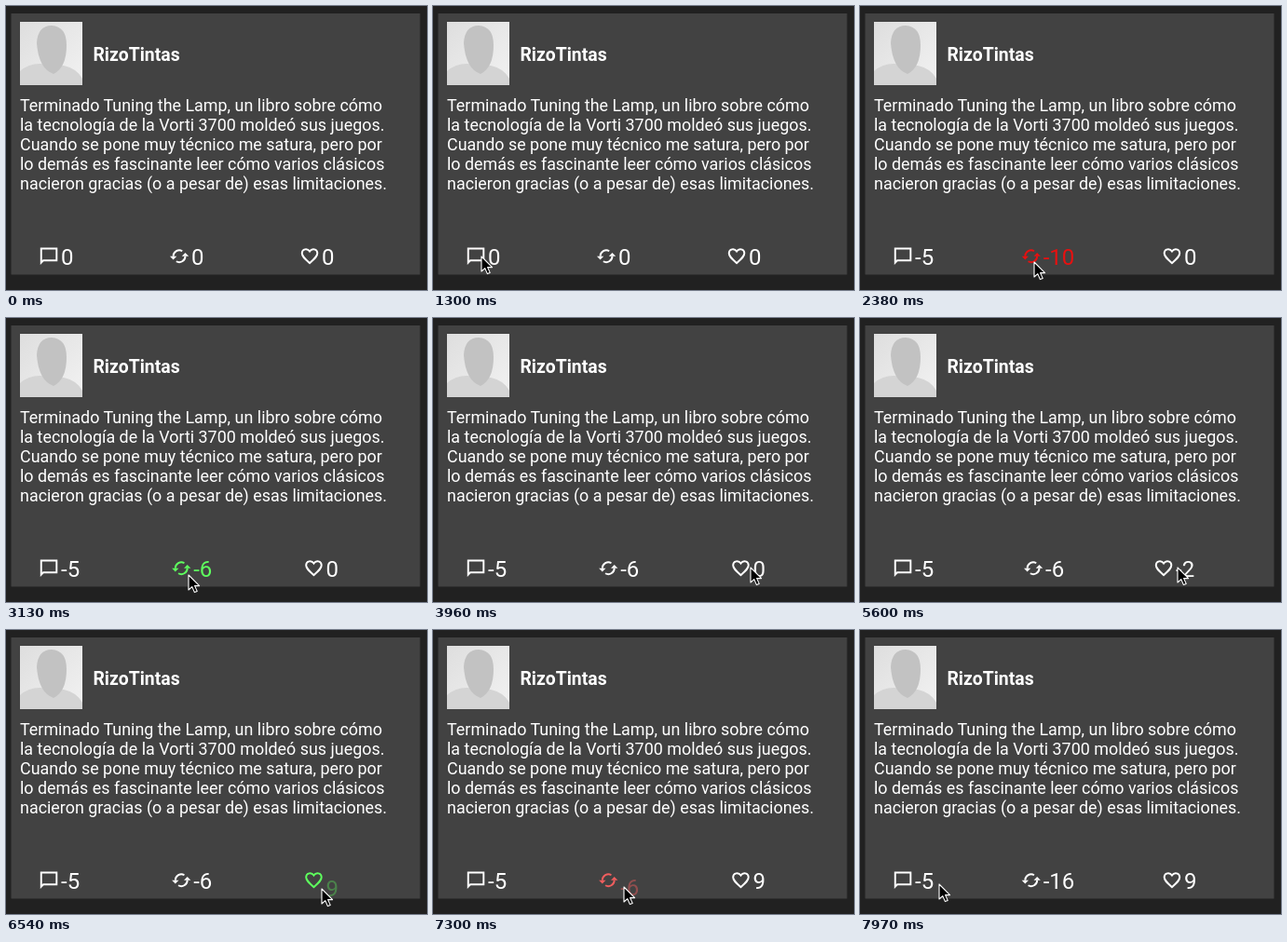
Recreate the animation shown at these times as an HTML page. Size 452 px wide and 305 px high, loop 8 s.

```html
<!DOCTYPE html>
<html lang="es">
<head>
<meta charset="utf-8">
<title>Tarjeta con contadores</title>
<style>
  html, body { margin: 0; width: 100%; height: 100%; overflow: hidden; background: #212121; }
  svg { display: block; font-family: Roboto, sans-serif; fill: #fff; }
  .name { font-size: 19.4px; font-weight: 700; }
  .body { font-size: 17.91px; }
  .stat { font-size: 24px; fill: currentColor; }
  .line { fill: none; stroke: currentColor; stroke-width: 2.1; }
</style>
</head>
<body>
<svg width="452" height="305" viewBox="0 0 452 305">
  <defs>
    <linearGradient id="paper" x1="0" y1="0" x2="1" y2="1">
      <stop offset="0" stop-color="#dedede"/>
      <stop offset="1" stop-color="#f2f2f2"/>
    </linearGradient>
    <clipPath id="frame"><rect x="15" y="17" width="67" height="68"/></clipPath>
    <g id="arrow">
      <path class="line" d="M5 12A7 7 0 0 1 15.5 6"/>
      <path d="M1 12H9L5 16Z"/>
    </g>
  </defs>
  <rect width="452" height="305" fill="#212121"/>
  <rect x="5.5" y="8" width="439" height="280.5" fill="#424242"/>

  <g clip-path="url(#frame)">
    <rect x="15" y="17" width="67" height="68" fill="url(#paper)"/>
    <path d="M15 85V70Q24 62 36 62L62 64Q76 67 82 78V85Z" fill="#d4d4d4"/>
    <path d="M33 40Q34 21 49 21Q65 22 65 42Q65 66 51 73Q35 67 33 40Z" fill="#c2c2c2"/>
  </g>

  <text class="name" x="93.5" y="59">RizoTintas</text>
  <g class="body">
    <text x="15" y="113">Terminado Tuning the Lamp, un libro sobre cómo</text>
    <text x="15" y="134">la tecnología de la Vorti 3700 moldeó sus juegos.</text>
    <text x="15" y="155">Cuando se pone muy técnico me satura, pero por</text>
    <text x="15" y="176">lo demás es fascinante leer cómo varios clásicos</text>
    <text x="15" y="197">nacieron gracias (o a pesar de) esas limitaciones.</text>
  </g>

  <g class="stat">
    <g><path class="line" d="M3 3H21V17H5.5L3 19.5Z"/></g>
    <text>0</text>
  </g>
  <g class="stat">
    <g><use href="#arrow"/><use href="#arrow" transform="rotate(180 12 12)"/></g>
    <text>0</text>
  </g>
  <g class="stat">
    <g><path class="line" d="M12 20C6 14.6 3 12 3 8.5C3 3.2 9.5 2.4 12 6.3C14.5 2.4 21 3.2 21 8.5C21 12 18 14.6 12 20Z"/></g>
    <text>0</text>
  </g>

  <path id="cursor" d="M0 0V16L3.8 12.6L6.4 18.6L9.2 17.4L6.6 11.6H11.6Z" fill="#000" stroke="#fff" stroke-width="1.1" stroke-linejoin="round"/>
</svg>
<script>
const LOOP = 8000;
const WHITE = [255, 255, 255], RED = [232, 16, 16], GREEN = [94, 255, 94];
const LEFT = 35, ROW_WIDTH = 420, ICON_WIDTH = 24, BASELINE = 278.4, SLIDE = 12;

// Clicks per counter: [time, new value]
const clicks = [
  [[1300, -5]],
  [[2090, -10], [2720, -6], [7220, -16]],
  [[3960, -4], [4760, -2], [5600, 4], [6330, 9]]
];

// Pointer stops: [arrival time, x, y]; it enters from below the stage
const stops = [
  [0, 150, 310], [580, 34, 271], [1160, 52, 269], [1930, 187, 275], [2700, 196, 276],
  [3730, 341, 268], [6500, 339, 278], [7030, 205, 276], [7970, 85, 273]
];

const stats = [...document.querySelectorAll('.stat')].map(el => ({
  el, icon: el.children[0], label: el.children[1]
}));
const cursor = document.getElementById('cursor');

const clamp = v => Math.max(0, Math.min(1, v));
const ramp = (t, a, b) => clamp((t - a) / (b - a));
const mix = (a, b, p) => a + (b - a) * p;

function counter(list, t) {
  let from = 0, value = 0, start = -LOOP;
  for (const [time, next] of list) {
    if (t < time) break;
    from = value; value = next; start = time;
  }
  const age = t - start, up = value > from;
  const leaving = age < 160;
  const shown = leaving ? 1 - ramp(age, 0, 150) : ramp(age, 170, 290);
  const side = up === leaving ? -1 : 1;
  const tint = ramp(age, 0, 120) * (1 - ramp(age, 430, 600));
  const target = up ? GREEN : RED;
  return {
    text: leaving ? from : value,
    shown,
    dy: side * SLIDE * (1 - shown),
    color: `rgb(${WHITE.map((c, i) => Math.round(mix(c, target[i], tint)))})`
  };
}

function drawStats(t) {
  const widths = stats.map(({ el, label }, i) => {
    const s = counter(clicks[i], t);
    label.textContent = s.text;
    label.setAttribute('opacity', s.shown);
    label.setAttribute('y', BASELINE + s.dy);
    el.setAttribute('color', s.color);
    return ICON_WIDTH + label.getComputedTextLength();
  });
  // Spare room is shared equally by the three columns
  const gap = (ROW_WIDTH - widths.reduce((a, b) => a + b)) / 3;
  let x = LEFT;
  stats.forEach(({ icon, label }, i) => {
    icon.setAttribute('transform', `translate(${x} 257.7) scale(.92)`);
    label.setAttribute('x', x + ICON_WIDTH);
    x += widths[i] + gap;
  });
}

// Longer moves take more time and sag in a deeper arc
function pointer(t) {
  let [, x, y] = stops[0];
  for (const [end, toX, toY] of stops.slice(1)) {
    const reach = Math.abs(toX - x);
    const p = ramp(t, end - 200 - reach, end);
    const e = p * p * (3 - 2 * p);
    x = mix(x, toX, e);
    y = mix(y, toY, e) + reach * 0.09 * Math.sin(Math.PI * p);
    if (p < 1) break;
  }
  return [x, y];
}

function draw() {
  const t = performance.now() % LOOP;
  drawStats(t);
  cursor.setAttribute('transform', `translate(${pointer(t)})`);
  requestAnimationFrame(draw);
}
draw();
</script>
</body>
</html>
```
